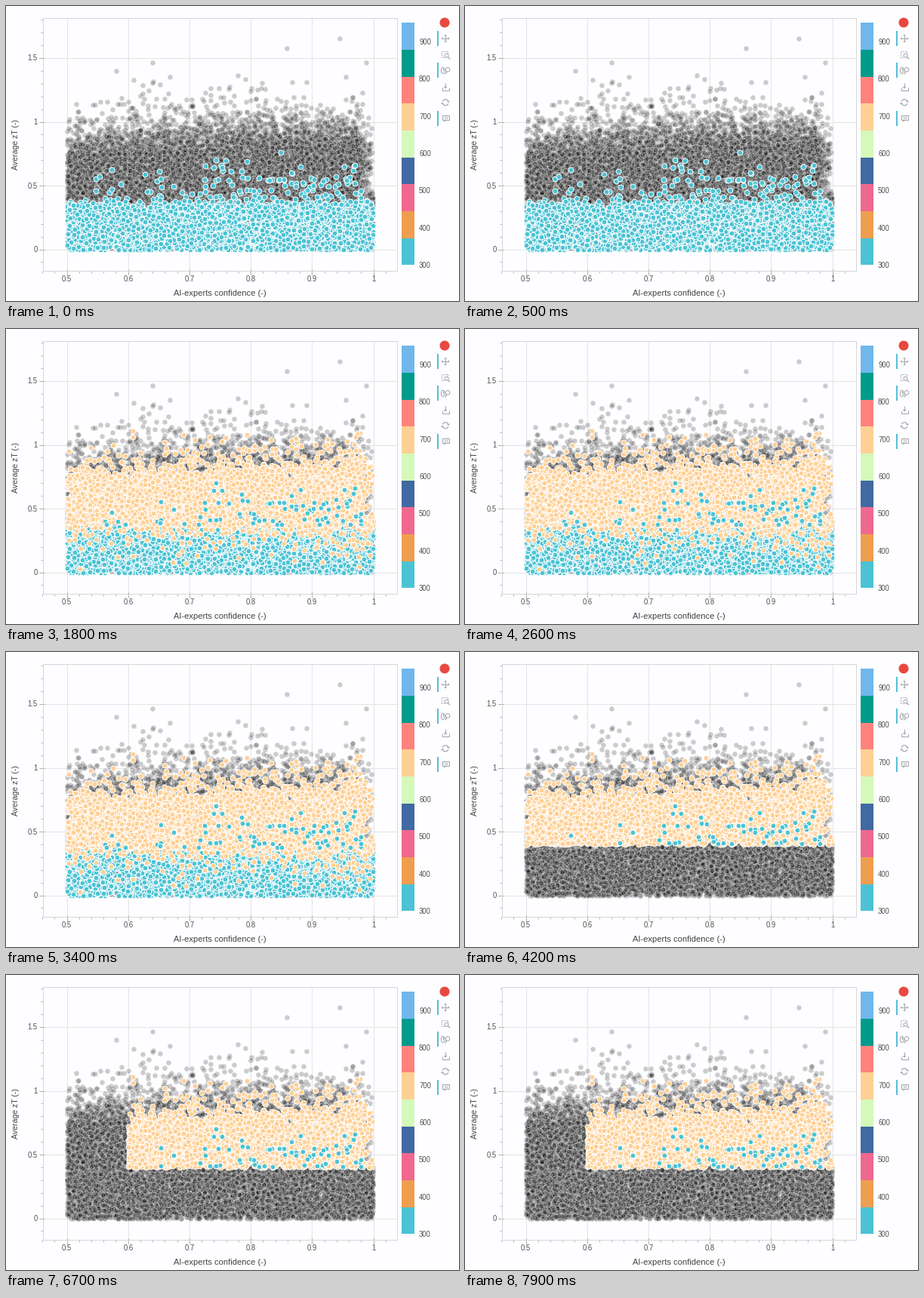
A matplotlib script that plays this animation: 600x391 px, repeating every 8000 ms.

```python
import numpy as np
import matplotlib.pyplot as plt
from matplotlib.animation import FuncAnimation
from matplotlib.patches import Arc, Circle, Ellipse, Rectangle

W, H, DPI = 600, 391, 64
PT = 72 / DPI  # points per pixel
FRAMES, STEP = 80, 100
SWITCH = (1400, 3900, 6700)  # ms at which the selection changes

CYAN, PEACH = "#4bc3d4", "#ffd094"
BAR = [CYAN, "#ef9e4f", "#f0688f", "#4169a2", "#d4f9bb",
       PEACH, "#ff827c", "#009b8c", "#70b7eb"]
ICON, ACTIVE, INK, GRID = "#a3a7aa", "#30add6", "#505050", "#e3e3e6"

rng = np.random.default_rng(12)

fig = plt.figure(figsize=(W / DPI, H / DPI), dpi=DPI, facecolor="#fefdff")
ax = fig.add_axes([0, 0, 1, 1])
ax.set(xlim=(0, W), ylim=(H, 0))
ax.axis("off")


def px(v):
    return 80.5 + 812 * (np.asarray(v) - 0.5)


def py(v):
    return 322.5 - 169 * np.asarray(v)


def line(xs, ys, color=ICON, lw=1.0, **kw):
    ax.plot(xs, ys, color=color, lw=lw * PT, zorder=1,
            solid_capstyle="butt", **kw)


def label(x, y, s, size=9.5, ha="center", color=INK, **kw):
    ax.text(x, y, s, fontsize=size * PT, family="Liberation Sans",
            color=color, ha=ha, va="center", **kw)


# ---- axes -------------------------------------------------------------

L, R, T, B = 48.5, 517.5, 15.5, 350.5


def draw_axes():
    for v in np.arange(5, 11) / 10:
        line([px(v)] * 2, [T, B], GRID)
        line([px(v)] * 2, [B - 2, B + 5], "#a0a0a0")
        label(px(v), 362, f"{v:g}")
    for v in np.arange(4) / 2:
        line([L, R], [py(v)] * 2, GRID)
        line([L - 5, L + 2], [py(v)] * 2, "#a0a0a0")
        label(41.5, py(v) + 0.5, f"{v:g}", ha="right")
    for v in np.arange(0.46, 1.035, 0.02):
        line([px(v)] * 2, [B, B + 3], "#b8b8b8")
    for v in np.arange(-0.1, 1.85, 0.1):
        line([L - 3, L], [py(v)] * 2, "#b8b8b8")
    line([L, R, R, L, L], [T, T, B, B, T], "#d6d6d8")
    label(283, 380.5, "AI-experts confidence (-)", 11.1, color="#444444")
    label(13, 184, "Average zT (-)", 10.5, color="#444444", rotation=90)


def draw_colorbar():
    top, bottom = 22.4, 343.3
    h = (bottom - top) / len(BAR)
    for i, c in enumerate(BAR):
        ax.add_patch(Rectangle((524, bottom - (i + 1) * h), 17, h,
                               fc=c, lw=0))
    for i in range(7):
        label(547, 344 - 49.3 * i, str(300 + 100 * i), ha="left")


# ---- toolbar ----------------------------------------------------------

CX = 582


def outline(shape):
    shape.set(fc="none", ec=ICON, lw=PT)
    ax.add_patch(shape)


def arrow_head(x, y, dx, dy, s=2.0):
    ax.fill([x + dx * s, x - dy * s, x + dy * s],
            [y + dy * s, y + dx * s, y - dx * s], color=ICON, lw=0)


def pan_icon(y):
    line([CX - 4, CX + 4], [y, y])
    line([CX, CX], [y - 4, y + 4])
    for dx, dy in ((1, 0), (-1, 0), (0, 1), (0, -1)):
        arrow_head(CX + 3.5 * dx, y + 3.5 * dy, dx, dy)


def box_zoom_icon(y):
    line([CX + 3, CX + 3, CX - 5, CX - 5, CX - 1],
         [y - 2, y - 4, y - 4, y + 4, y + 4], ls=(0, (1.6, 1.2)))
    outline(Circle((CX + 1.5, y + 1.5), 2.5))
    line([CX + 3.3, CX + 6], [y + 3.3, y + 6], lw=1.3)


def wheel_zoom_icon(y):
    outline(Ellipse((CX - 3.3, y), 4.6, 8.4))
    line([CX - 3.3] * 2, [y - 3, y])
    outline(Circle((CX + 3, y - 1), 2.8))
    line([CX + 1.5, CX], [y + 1.3, y + 5], lw=1.3)


def save_icon(y):
    line([CX, CX], [y - 4.5, y + 1])
    arrow_head(CX, y + 0.5, 0, 1, 2.4)
    line([CX - 4.5, CX - 4.5, CX + 4.5, CX + 4.5], [y + 1, y + 5, y + 5, y + 1])


def reset_icon(y):
    for side in (1, -1):
        start = 110 - 90 * side
        ax.add_patch(Arc((CX, y), 8, 8, theta1=start, theta2=start + 130,
                         ec=ICON, lw=1.2 * PT))
        arrow_head(CX + 4 * side, y - 2 * side, 0, side, 2.2)


def hover_icon(y):
    outline(Rectangle((CX - 4.5, y - 4), 9, 6))
    arrow_head(CX - 1, y + 3, 0, 1, 1.5)
    for dy in (-2, 0):
        line([CX - 2.5, CX + 2.5], [y + dy] * 2, lw=0.8)


def draw_toolbar():
    ax.add_patch(Circle((581, 22), 6.5, fc="#e8483f", lw=0))
    icons = (pan_icon, box_zoom_icon, wheel_zoom_icon,
             save_icon, reset_icon, hover_icon)
    for i, icon in enumerate(icons):
        y = 43 + 21.2 * i
        icon(y)
        if icon in (pan_icon, wheel_zoom_icon, hover_icon):
            line([572, 572], [y - 10.5, y + 10], ACTIVE, 1.6)


# ---- data -------------------------------------------------------------

def cloud(x, y, limit):
    """Fold the ragged upper right edge inwards and cap the height."""
    edge = (x > 0.975) & (y > 0.45)
    x = np.where(edge, x - 0.03 * rng.random(len(x)), x)
    keep = y < limit
    return np.column_stack([px(x), py(np.maximum(y, 0))])[keep]


def others(n=10500):
    """Dense block with a thinning top, and five lone high points."""
    x = 0.5 + 0.5 * rng.random(n)
    top = 0.75 + 0.11 * np.sin(np.pi * (x - 0.5) / 0.6)
    y = np.where(rng.random(n) < 0.87, top * rng.random(n),
                 top + rng.exponential(0.115, n))
    lone = [(442, 43), (372, 56), (194, 75), (477, 75), (146, 86)]
    return np.vstack([cloud(x, y, 1.37), lone])


def cold(n=3300):
    x = 0.5 + 0.5 * rng.random(n)
    y = 0.36 * rng.random(n) + rng.normal(0, 0.012, n)
    return cloud(x, y, 0.45)


def cold_strays(n, skew):
    x = 0.5 + 0.49 * rng.random(n) ** skew
    return cloud(x, 0.37 + rng.exponential(0.11, n), 0.78)


def warm(n=4700):
    u = rng.random(n)
    lo, hi = 0.385 - 0.03 * u, 0.74 + 0.1 * u
    kind = rng.random(n)
    y = lo + (hi - lo) * rng.random(n)
    y = np.where(kind < 0.07, hi + rng.exponential(0.09, n), y)
    y = np.where(kind > 0.95, lo - rng.exponential(0.07 + 0.03 * u), y)
    return cloud(0.5 + 0.5 * u, np.abs(y), 1.13)


def dots(face, edge, z):
    return ax.plot([], [], "o", ms=6.8 * PT, mfc=face, mec=edge, mew=PT,
                   zorder=z)[0]


other = others()
muted = dots((0, 0, 0, 0.2), (1, 1, 1, 0.28), 3)
# marker, points, first stage in which they can be selected
layers = [(dots(CYAN, "white", 4), np.vstack([cold(), cold_strays(70, 0.8)]), 0),
          (dots(PEACH, "white", 5), warm(), 1),
          (dots(CYAN, "white", 6), cold_strays(85, 0.45), 0)]


def chosen(pts, first, stage):
    mask = np.full(len(pts), stage >= first)
    if stage >= 2:
        mask &= pts[:, 1] <= py(0.4)
    if stage >= 3:
        mask &= pts[:, 0] >= px(0.6)
    return mask


def update(i):
    stage = sum(i * STEP >= t for t in SWITCH)
    rest = [other]
    for dot, pts, first in layers:
        mask = chosen(pts, first, stage)
        dot.set_data(*pts[mask].T)
        rest.append(pts[~mask])
    muted.set_data(*np.vstack(rest).T)
    return [muted] + [layer[0] for layer in layers]


draw_axes()
draw_colorbar()
draw_toolbar()
anim = FuncAnimation(fig, update, frames=FRAMES, interval=STEP,
                     repeat=True, repeat_delay=0, blit=False)
plt.show()
```
